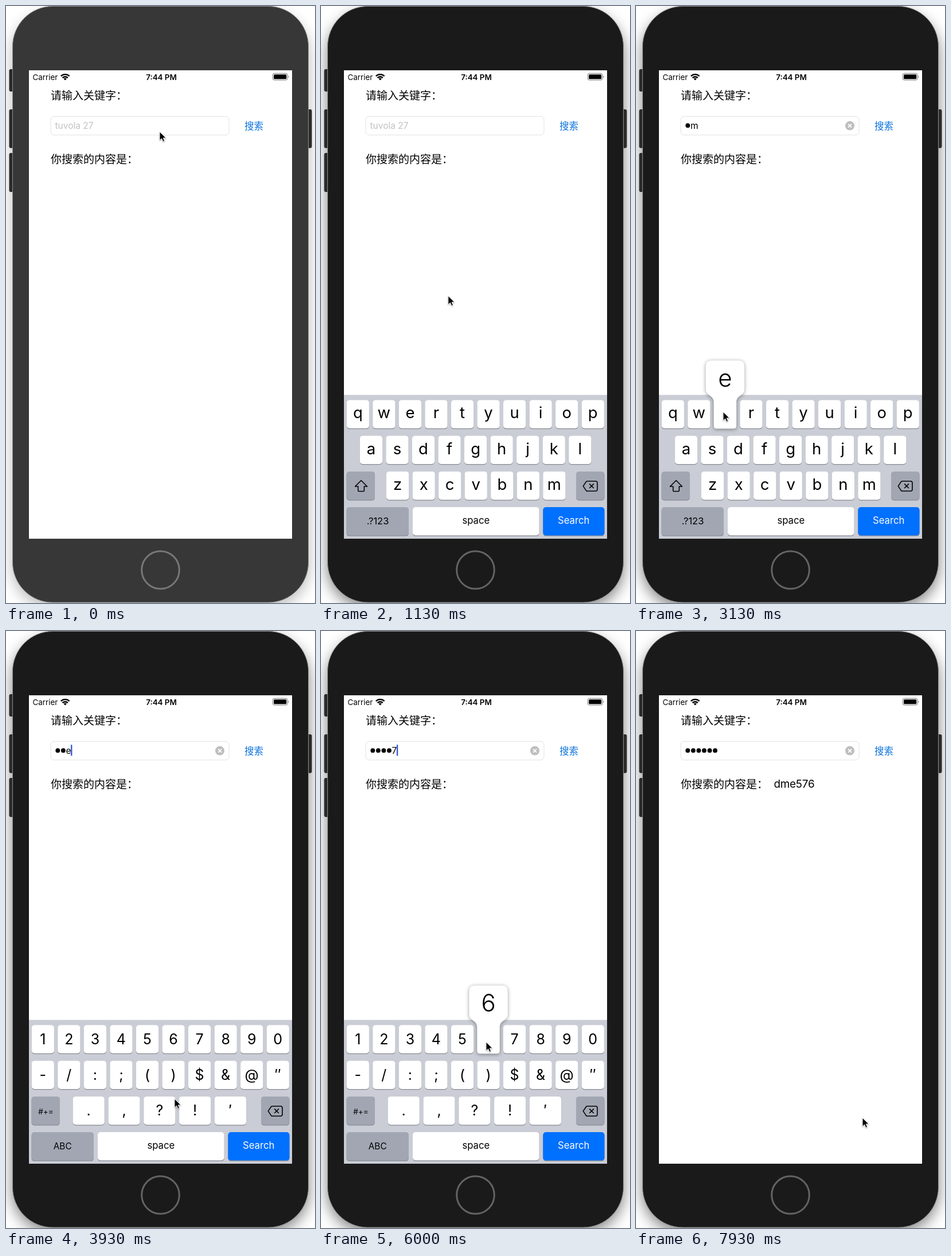
Write an HTML page that moves like this. It is 539 px wide and 1040 px high and loops after 8 s.

```html
<!DOCTYPE html>
<html lang="zh">
<head>
<meta charset="utf-8">
<title>Search field</title>
<style>
  html, body { margin: 0; width: 100%; height: 100%; overflow: hidden; background: #fff; }
  svg { display: block; width: 100%; height: 100%; }
  text { font-family: Inter, Roboto, sans-serif; white-space: pre; }
  .zh { font-family: "Noto Sans CJK SC", "Noto Sans CJK", sans-serif; }
  .mid { text-anchor: middle; }
  #popup { filter: drop-shadow(0 1px 3px rgba(0, 0, 0, .4)); }
  #cursor { filter: drop-shadow(0 1px 1px rgba(0, 0, 0, .35)); }
  #shadow { filter: blur(13px); }
</style>
</head>
<body>
<svg viewBox="0 0 539 1040">
  <defs>
    <clipPath id="screen"><rect x="40" y="112" width="459" height="816"/></clipPath>
  </defs>
  <rect width="539" height="1040" fill="#fff"/>
  <rect id="shadow" x="11" y="12" width="517" height="1036" rx="72"/>
  <g id="buttons" fill="#2a2a2a">
    <rect x="5.5" y="110" width="12" height="39" rx="3"/>
    <rect x="5.5" y="180" width="12" height="67.5" rx="3"/>
    <rect x="5.5" y="256" width="12" height="68" rx="3"/>
    <rect x="521" y="180" width="12.5" height="67.5" rx="3"/>
  </g>
  <rect id="body" x="11.5" y=".5" width="516" height="1038.5" rx="70" stroke="#8e8e8e"/>
  <circle id="home" cx="269.5" cy="982.5" r="32.8" fill="none" stroke-width="3"/>

  <g clip-path="url(#screen)">
    <rect x="40" y="112" width="459" height="816" fill="#fff"/>
    <text x="46.5" y="128.5" font-size="13.4">Carrier</text>
    <g fill="none" stroke="#000" stroke-width="2.4">
      <path d="M95.8 122.2a10.4 10.4 0 0 1 14.8 0M98.6 125.2a6.5 6.5 0 0 1 9.2 0"/>
    </g>
    <path d="M103.2 129.6l-2.7-2.8a3.8 3.8 0 0 1 5.4 0z"/>
    <text class="mid" x="271" y="128.5" font-size="13.4" font-weight="600">7:44 PM</text>
    <rect x="465.2" y="117.4" width="25.8" height="11.6" rx="3" fill="none" stroke="#777"/>
    <rect x="467" y="119.2" width="22.2" height="8" rx="1.5"/>
    <path d="M492.3 121.2q2.2 2 0 4z" fill="#777"/>

    <text class="zh" x="78" y="163" font-size="19">请输入关键字：</text>
    <rect x="78" y="192.3" width="311" height="32.5" rx="6" fill="#fff" stroke="#e2e2e2"/>
    <text id="hint" x="85.5" y="213.5" font-size="15.5" fill="#c2c2c4">tuvola 27</text>
    <g id="dots"></g>
    <text id="glyph" y="213.5" font-size="15.5"></text>
    <rect id="caret" y="198" width="2.4" height="19.5" rx="1" fill="#3a5cd8"/>
    <g id="clear">
      <circle cx="373" cy="208.6" r="8" fill="#bebec0"/>
      <path d="M370 205.6l6 6m0-6l-6 6" stroke="#fff" stroke-width="1.7"/>
    </g>
    <text class="zh" x="416" y="214.5" font-size="16.5" fill="#0a72dc">搜索</text>
    <text class="zh" x="78" y="274" font-size="19">你搜索的内容是：</text>
    <text id="result" x="240.5" y="273.3" font-size="18.8" letter-spacing="-.2"></text>

    <g id="board">
      <rect x="40" y="677.5" width="459" height="251" fill="#cacdd5"/>
      <g id="common"></g>
      <g id="letters"></g>
      <g id="symbols"></g>
      <path d="M464.5 827.8H479a3 3 0 0 1 3 3v11.2a3 3 0 0 1-3 3H464.500q-1.200 0-2-.9l-5.200-7.700 5.200-7.700q.8-.9 2-.9zM468.200 832.400l7.600 7.600m0-7.600l-7.600 7.600"
        fill="none" stroke="#000" stroke-width="1.6" stroke-linejoin="round"/>
      <g id="popup">
        <path id="bubble" fill="#fff"/>
        <text id="big" class="mid" font-size="42" font-weight="300"></text>
      </g>
    </g>
  </g>

  <path id="cursor" d="M0 0V15.200L3.600 11.900L6 17.300L8.600 16.200L6.300 10.900H11.200Z" fill="#000" stroke="#fff" stroke-width="1"/>
</svg>

<script>
const LOOP = 8000, STEP = 1000 / 15;
const NAME = "dme576";
const TYPED = [1470, 2267, 3267, 4800, 5330, 6067];
const FOCUS = 133, RISE = 313, SWAP = 3660, SUBMIT = 6960;
const ROW_Y = [686.5, 748.7, 810.9, 873];
const X0 = 85.4, PITCH = 9.55;

// time, x, y
const PATH = [
  [0, 268, 219], [267, 270, 217], [930, 270, 217],
  [1330, 176, 779], [1667, 176, 779],
  [2110, 408, 825], [2470, 408, 825],
  [3100, 152, 707], [3400, 152, 707],
  [3600, 112, 888], [3690, 112, 888],
  [3933, 294, 815], [4130, 294, 812],
  [4530, 248, 716], [4930, 248, 716],
  [5170, 336, 716], [5670, 336, 716],
  [5860, 288, 716], [6210, 288, 716],
  [6660, 437, 901], [7733, 437, 901], [7933, 395, 848]
];

const $ = id => document.getElementById(id);
const keys = {};

function add(parent, tag, attrs, content) {
  const el = document.createElementNS("http://www.w3.org/2000/svg", tag);
  for (const k in attrs) el.setAttribute(k, attrs[k]);
  if (content) el.textContent = content;
  return parent.appendChild(el);
}

function cap(parent, x, y, width, fill = "#fff") {
  const box = { x, width, height: 49.3, rx: 5 };
  add(parent, "rect", { ...box, y: y + 1.3, fill: "#888b92" });
  add(parent, "rect", { ...box, y, fill });
}

function label(parent, x, y, size, content, fill = "#000") {
  add(parent, "text", { class: "mid", x, y, "font-size": size, fill }, content);
}

function keyRow(parent, chars, x, row, pitch, width, size, base) {
  [...chars].forEach((c, i) => {
    const left = x + i * pitch, y = ROW_Y[row];
    cap(parent, left, y, width);
    label(parent, left + width / 2, y + base, size, c);
    keys[c] = { x: left + width / 2, y };
  });
}

function buildBoard() {
  const common = $("common"), letters = $("letters"), symbols = $("symbols");
  const grey = "#a1a6b2";
  cap(common, 44.5, ROW_Y[2], 49.5, grey);
  cap(common, 445, ROW_Y[2], 49.5, grey);
  cap(common, 44.5, ROW_Y[3], 108.5, grey);
  cap(common, 160, ROW_Y[3], 220.5);
  cap(common, 387.3, ROW_Y[3], 107.2, "#0070ff");
  label(common, 270.3, 902, 16.7, "space");
  label(common, 440.7, 902, 16.7, "Search", "#fff");

  ["qwertyuiop", "asdfghjkl", "zxcvbnm"].forEach((chars, row) =>
    keyRow(letters, chars, [44.7, 67.8, 114][row], row, 45.55, 39.2, 27.5, 31.8));
  add(letters, "path", {
    d: "M70 826.5L80.500 837H75.300V844q0 1.500-1.500 1.500H66.200q-1.500 0-1.500-1.500V837H59.500Z",
    fill: "none", stroke: "#000", "stroke-width": 1.6, "stroke-linejoin": "round"
  });
  label(letters, 99, 903, 16.5, ".?123");

  keyRow(symbols, "1234567890", 44.7, 0, 45.55, 39.2, 25, 33.8);
  keyRow(symbols, "-/:;()$&@″", 44.7, 1, 45.55, 39.2, 25, 33);
  keyRow(symbols, ".,?!′", 116.7, 2, 61.8, 55, 25, 33.5);
  label(symbols, 69.5, 841.5, 13.5, "#+=");
  label(symbols, 98.7, 903.3, 15.3, "ABC");
}

function bubblePath(x, y) {
  return `M${x - 33.7} ${y - 59}q0-10 10-10h47.400q10 0 10 10v40c0 12-14 10-14 23V${y + 45}` +
    `q0 5-5 5h-29.400q-5 0-5-5V${y + 4}c0-13-14-11-14-23z`;
}

const show = (id, on) => $(id).setAttribute("display", on ? "inline" : "none");

// Critically damped spring from 0 to 1
function spring(ms) {
  if (ms <= 0) return 0;
  const u = ms * .018;
  return ms > 500 ? 1 : 1 - (1 + u) * Math.exp(-u);
}

function cursorAt(t) {
  const i = PATH.findIndex(p => p[0] > t);
  if (i < 0) return PATH[PATH.length - 1].slice(1);
  const [a, b] = [PATH[i - 1], PATH[i]];
  const u = (t - a[0]) / (b[0] - a[0]), e = u * u * (3 - 2 * u);
  return [a[1] + (b[1] - a[1]) * e, a[2] + (b[2] - a[2]) * e];
}

function drawField(t) {
  const count = TYPED.filter(at => at <= t).length;
  const last = count ? TYPED[count - 1] : RISE;
  const plain = count > 0 && t - last < 1400 && t < 6800;
  const masked = plain ? count - 1 : count;
  [...$("dots").children].forEach((dot, i) => dot.setAttribute("display", i < masked ? "inline" : "none"));

  const glyph = $("glyph"), x = X0 + masked * PITCH;
  glyph.textContent = plain ? NAME[count - 1] : "";
  glyph.setAttribute("x", x);
  $("caret").setAttribute("x", x + (plain ? glyph.getComputedTextLength() - .5 : 0));
  show("caret", t >= RISE && t < SUBMIT && (t - last) % 1000 < 700);
  show("hint", !count);
  show("clear", count);
  $("result").textContent = t >= SUBMIT ? NAME : "";
}

function drawBoard(t) {
  const up = spring(t - RISE) - spring(t - SUBMIT);
  $("board").setAttribute("transform", `translate(0 ${(1 - up) * 251})`);
  show("letters", t < SWAP);
  show("symbols", t >= SWAP);

  const hit = TYPED.findIndex(at => Math.abs(t - at) < 134);
  show("popup", hit >= 0);
  if (hit < 0) return;
  const key = keys[NAME[hit]], big = $("big");
  $("bubble").setAttribute("d", bubblePath(key.x, key.y));
  big.textContent = NAME[hit];
  big.setAttribute("x", key.x);
  big.setAttribute("y", key.y - 23.3);
}

function draw(t) {
  const active = t >= FOCUS;
  $("body").setAttribute("fill", active ? "#1a1a1a" : "#373737");
  $("home").setAttribute("stroke", active ? "#646464" : "#787878");
  $("shadow").setAttribute("opacity", active ? .5 : .28);
  drawField(t);
  drawBoard(t);
  const [x, y] = cursorAt(t);
  $("cursor").setAttribute("transform", `translate(${x} ${y})`);
}

function frame() {
  const t = performance.now() % LOOP;
  draw(Math.floor((t + 5) / STEP) * STEP % LOOP);
  requestAnimationFrame(frame);
}

buildBoard();
for (let i = 0; i < NAME.length; i++)
  add($("dots"), "circle", { cx: 90.3 + i * PITCH, cy: 208.2, r: 3.9 });
frame();
</script>
</body>
</html>
```
